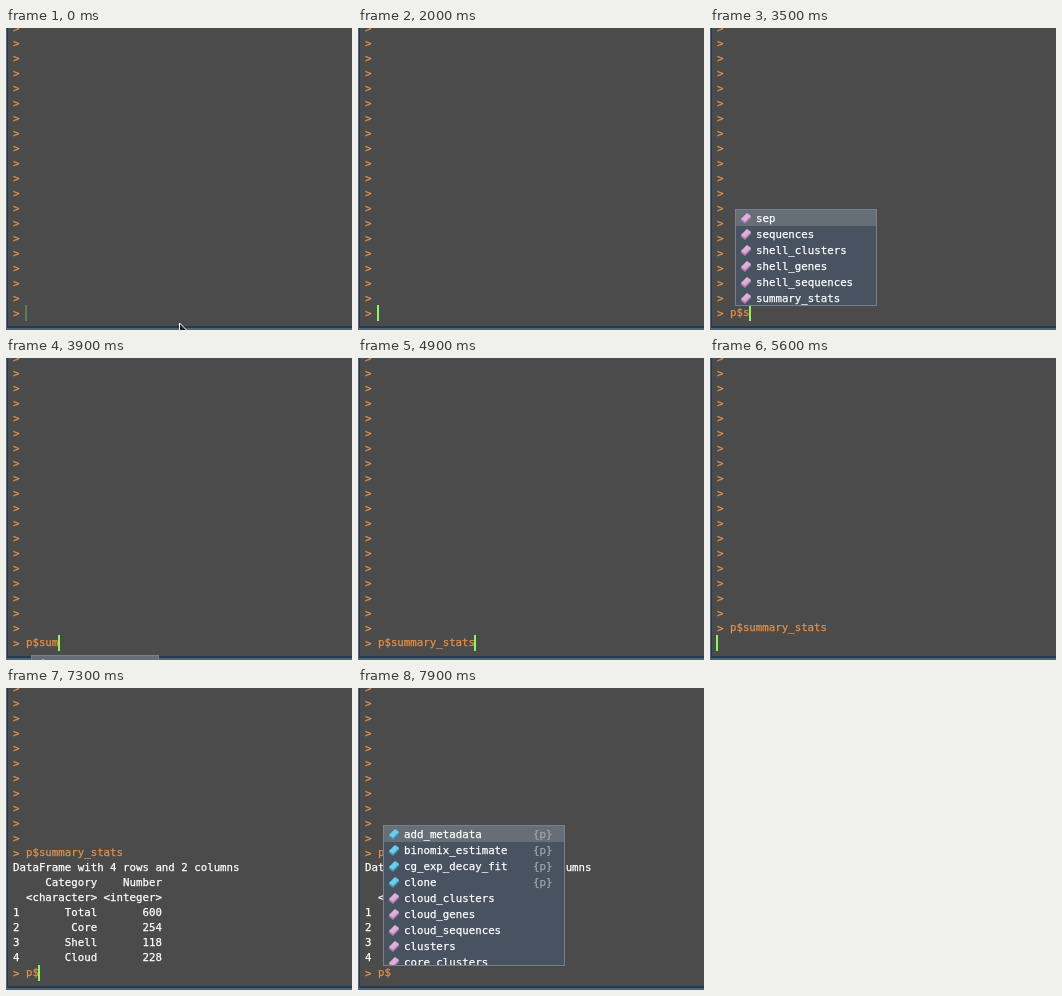
An HTML page with a canvas for the animation above (8000 ms loop, 346 by 302 pixels).

```html
<!DOCTYPE html>
<html lang="en">
<head>
<meta charset="utf-8">
<title>Console session</title>
<style>
html, body { margin: 0; overflow: hidden; background: #4b4b4b; }
canvas { display: block; }
</style>
</head>
<body>
<canvas id="stage" width="346" height="302"></canvas>
<script>
const ctx = document.getElementById('stage').getContext('2d');
const LOOP = 8000, LEFT = 7, CHAR = 6.47, LINE = 15, LAST = 285, ROW = 16;
const ORANGE = '#e4904a', WHITE = '#fff';

const METHODS = ['add_metadata', 'binomix_estimate', 'cg_exp_decay_fit', 'clone'];
const ALL = [...METHODS, 'cloud_clusters', 'cloud_genes', 'cloud_sequences', 'clusters', 'core_clusters'];
const S_ITEMS = ['sep', 'sequences', 'shell_clusters', 'shell_genes', 'shell_sequences', 'summary_stats'];
const COMMAND = '> p$summary_stats';
const OUTPUT = [
  'DataFrame with 4 rows and 2 columns',
  '     Category    Number',
  '  <character> <integer>',
  '1       Total       600',
  '2        Core       254',
  '3       Shell       118',
  '4       Cloud       228'
];

const popups = {
  all: { y: 137, w: 182, h: 141, items: ALL },
  s: { y: 181, w: 142, h: 97, items: S_ITEMS },
  sum: { y: 297, w: 128, h: 18, items: ['summary_stats'] }
};

// start time, input line, cursor opacity, popup, lines above the input
const steps = [
  [0, '> ', 0.3],
  [2000, '> ', 1],
  [2500, '> p', 1],
  [3000, '> p$', 1, popups.all],
  [3500, '> p$s', 1, popups.s],
  [3800, '> p$su', 1, popups.sum],
  [3900, '> p$sum', 1, popups.sum],
  [4400, '> p$sum', 0, popups.sum],
  [4800, COMMAND, 1],
  [5500, '', 1, null, [COMMAND]],
  [5700, '> ', 1, null, [COMMAND, ...OUTPUT]],
  [6200, '> ', 0, null, [COMMAND, ...OUTPUT]],
  [6600, '> p', 1, null, [COMMAND, ...OUTPUT]],
  [7200, '> p$', 1, null, [COMMAND, ...OUTPUT]],
  [7400, '> p$', 1, popups.all, [COMMAND, ...OUTPUT]],
  [7900, '> p$', 0, popups.all, [COMMAND, ...OUTPUT]]
];

function rect(x, y, w, h, color) {
  ctx.fillStyle = color;
  ctx.fillRect(x, y, w, h);
}

// A hairline stroke gives the type a slightly heavier weight.
function text(str, x, y, color) {
  ctx.fillStyle = ctx.strokeStyle = color;
  ctx.lineWidth = 0.25;
  ctx.fillText(str, x, y);
  ctx.strokeText(str, x, y);
}

function polygon(points, color) {
  ctx.beginPath();
  points.forEach(([x, y]) => ctx.lineTo(x, y));
  ctx.closePath();
  ctx.fillStyle = color;
  ctx.fill();
}

function drawLine(line, y) {
  const isInput = line[0] === '>';
  if (isInput) text('>', LEFT, y + 4, ORANGE);
  text(isInput ? line.replace('>', ' ') : line, LEFT, y + 3, isInput ? ORANGE : WHITE);
}

function drawIcon(x, y, face, side) {
  polygon([[x, y + 1], [x + 6, y - 5], [x + 10, y - 2], [x + 10, y], [x + 4, y + 6], [x, y + 3]], side);
  polygon([[x, y + 1], [x + 6, y - 5], [x + 10, y - 2], [x + 4, y + 4]], face);
}

function drawPopup({ y, w, h, items }) {
  const x = 25;
  ctx.save();
  ctx.beginPath();
  ctx.rect(x, y, w, h);
  ctx.clip();
  rect(x, y, w, h, '#485260');
  rect(x, y, w, ROW + 1, '#666e76');
  items.forEach((item, i) => {
    const mid = y + 9 + i * ROW;
    const isMethod = METHODS.includes(item);
    drawIcon(x + 6, mid, isMethod ? '#6fcdec' : '#dcaed8', isMethod ? '#3a93b8' : '#a578a8');
    text(item, x + 21, mid + 4, WHITE);
    if (isMethod) text('{p}', x + 150, mid + 4, '#a2a6aa');
  });
  ctx.restore();
  ctx.strokeStyle = '#75818c';
  ctx.lineWidth = 1;
  ctx.strokeRect(x + 0.5, y + 0.5, w - 1, h - 1);
}

function drawPointer(x, y) {
  polygon([[x, y], [x, y + 13], [x + 3, y + 10], [x + 9, y + 9]], '#222');
  ctx.strokeStyle = '#fff';
  ctx.lineWidth = 1;
  ctx.stroke();
}

function drawFrame() {
  rect(0, 0, 346, 302, '#4b4b4b');
  rect(0, 0, 1, 302, '#56626c');
  rect(1, 0, 1, 300, '#203c54');
  rect(1, 298, 345, 2, '#203c54');
  rect(0, 300, 346, 2, '#56626c');
}

function draw(t) {
  const [, input, cursor, popup, above = []] = steps.findLast(step => step[0] <= t);
  ctx.font = '10.75px "DejaVu Sans Mono", monospace';
  drawFrame();

  const prompts = 19 - above.length;
  [...Array(prompts).fill('>'), ...above, input].forEach((line, i) => drawLine(line, i * LINE - (19 * LINE - LAST)));

  ctx.globalAlpha = cursor;
  rect(Math.ceil(LEFT + input.length * CHAR - 1), 277, 2, 16, '#90f45c');
  ctx.globalAlpha = 1;

  if (popup) drawPopup(popup);
  if (t < 200) drawPointer(173.5, t < 100 ? 295 : 299);
}

function tick() {
  draw(performance.now() % LOOP);
  requestAnimationFrame(tick);
}
tick();
</script>
</body>
</html>
```
